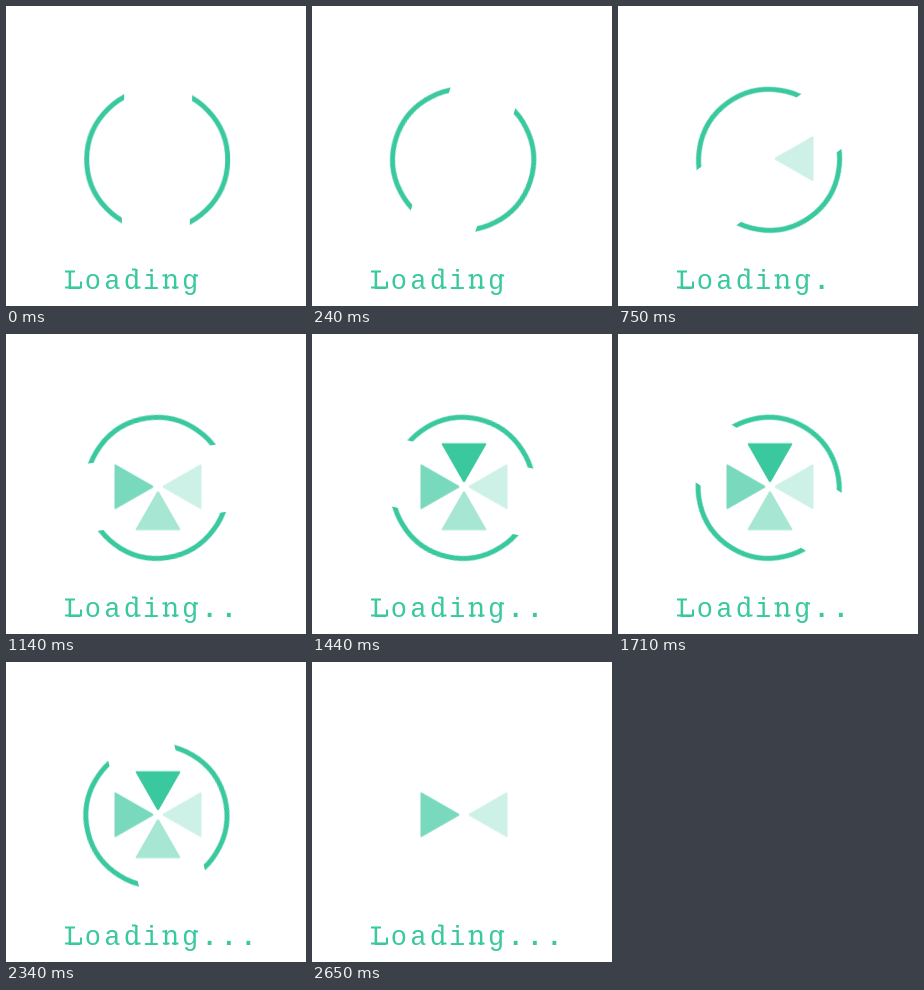
Recreate the animation shown at these times as an HTML page. Size 300 by 300 pixels, loop 2680 ms.

```html
<!DOCTYPE html>
<html lang="en">
<head>
<meta charset="utf-8">
<title>Loading</title>
<style>
  html, body { margin: 0; width: 100%; height: 100%; overflow: hidden; background: #fff; }
  svg { display: block; width: 100%; height: 100%; --c: #3ac89e; fill: var(--c); }

  .ring { fill: none; stroke: var(--c); stroke-width: 5; }
  .spin { transform-origin: 150.8px 153.5px; }
  .gap { fill: #fff; }
  text { font: 27px "Liberation Mono", "Courier New", monospace; letter-spacing: 3.23px; }
  .dot { font-weight: bold; }
  .serif { fill: none; stroke: var(--c); stroke-width: 2; }

  /* The small lead keeps hard changes clear of the 30 ms tick. */
  .spin, .ring, .blade, .dot { animation: 2680ms -2ms infinite step-end; }
  .spin { animation-name: turn; }
  .ring { animation-name: ring; }
  .right { animation-name: right; }
  .bottom { animation-name: bottom; }
  .left { animation-name: left; }
  .top { animation-name: top; }
  .d1 { animation-name: d1; }
  .d2 { animation-name: d2; }
  .d3 { animation-name: d3; }

  /* Half a turn in 2550 ms, then a short hold. */
  @keyframes turn {
    0% { transform: rotate(1.06deg); animation-timing-function: steps(85, end); }
    95.149%, 100% { transform: rotate(181.06deg); }
  }
  @keyframes ring { 0% { opacity: 1; } 98.881%, 100% { opacity: 0; } }
  @keyframes right { 0% { opacity: 0; } 23.507%, 100% { opacity: 1; } }
  @keyframes bottom { 0% { opacity: 0; } 31.343% { opacity: 1; } 98.881%, 100% { opacity: 0; } }
  @keyframes left { 0% { opacity: 0; } 40.299%, 100% { opacity: 1; } }
  @keyframes top { 0% { opacity: 0; } 48.134% { opacity: 1; } 98.881%, 100% { opacity: 0; } }
  @keyframes d1 { 0% { fill-opacity: 0; } 15.672%, 100% { fill-opacity: 1; } }
  @keyframes d2 { 0% { fill-opacity: 0; } 41.418%, 100% { fill-opacity: 1; } }
  @keyframes d3 { 0% { fill-opacity: 0; } 67.164%, 100% { fill-opacity: 1; } }
</style>
</head>
<body>
<svg viewBox="0 0 300 300">
  <!-- The ring sits slightly off its pivot. -->
  <g class="spin">
    <circle class="ring" cx="151.2" cy="153.5" r="70.5"/>
    <rect class="gap" x="117" y="76" width="68" height="155"/>
  </g>

  <defs>
    <path id="blade" d="M-21.5-43.4h43q1.3 0 .7 1.2L1.2-5.6Q0-3.8-1.2-5.6L-22.2-42.2q-.6-1.2.7-1.2z"/>
  </defs>
  <g transform="translate(152 152.7)">
    <g class="blade right"><use href="#blade" transform="rotate(90)" fill-opacity=".25"/></g>
    <g class="blade bottom"><use href="#blade" transform="rotate(180)" fill-opacity=".45"/></g>
    <g class="blade left"><use href="#blade" transform="rotate(270)" fill-opacity=".68"/></g>
    <g class="blade top"><use href="#blade"/></g>
  </g>

  <text x="59.4" y="282.5">Loading<tspan class="dot d1">.</tspan><tspan class="dot d2">.</tspan><tspan class="dot d3">.</tspan></text>
  <path class="serif" d="M59 265.500h10M59 281.500h16v-6M130 281.500h4.500M126 263.500h4M157 281.500h6.500M166 281.500h6.500M156.500 269.500h3.500M188 269.500h4"/>
</svg>
</body>
</html>
```
